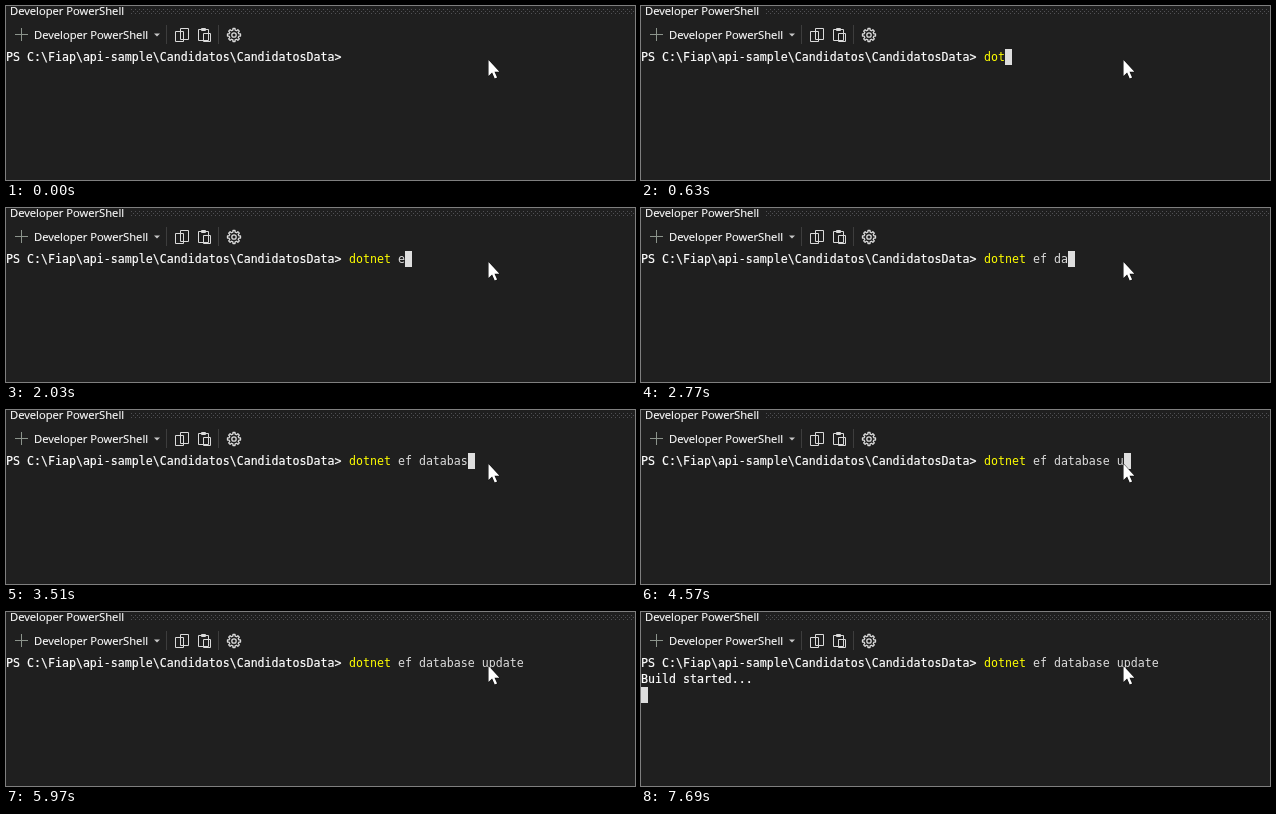
An HTML page that plays this animation: 629 by 174 pixels, repeating every 8000 ms.

```html
<!DOCTYPE html>
<html lang="en">
<head>
<meta charset="utf-8">
<title>Terminal</title>
<style>
  html, body { margin: 0; width: 100%; height: 100%; overflow: hidden; background: #1f1f1f; }
  svg { position: absolute; left: 0; top: 0; display: block; }
  .ui { font: 11.2px "Open Sans", "Noto Sans", sans-serif; fill: #fff; stroke: #fff; stroke-width: .15; }
  .term { font: 11.627px "DejaVu Sans Mono", "Noto Sans Mono", monospace; fill: #dcdcdc; white-space: pre; }
  .strong { fill: #fff; stroke: #fff; stroke-width: .2; }
  .icon { fill: #1f1f1f; stroke: #dadada; }
</style>
</head>
<body>
<svg width="629" height="174" viewBox="0 0 629 174">
  <defs>
    <pattern id="grip" x="125" y="3" width="4" height="4" patternUnits="userSpaceOnUse">
      <path d="M0 0h1v1h-1zM2 2h1v1h-1z" fill="#505054"/>
    </pattern>
  </defs>
  <rect width="629" height="174" fill="#1f1f1f"/>
  <rect x="125" y="3" width="504" height="5" fill="url(#grip)"/>
  <text class="ui" x="4" y="9">Developer PowerShell</text>
  <text class="ui" x="28" y="33">Developer PowerShell</text>

  <path d="M9 28.5H22M15.5 22V35" stroke="#8c948c"/>
  <path d="M148 27.500h6l-3 3z" fill="#c8c8c8"/>
  <path d="M160.500 19V38M212.500 19V38" stroke="#3d3d3d"/>
  <g class="icon">
    <path d="M169.500 25.500h8v10h-8zM174.500 22.500h8v11h-8z"/>
    <path d="M192.500 23.500h10v11h-10zM195.500 22.500h4v2h-4zM197.500 27.500h7v8h-7z"/>
    <path id="gear" stroke-linejoin="round" stroke-width="1.300"/>
    <circle cx="228" cy="29" r="2.200" stroke-width="1.300"/>
  </g>

  <text class="term strong" x="0" y="55">PS C:\Fiap\api-sample\Candidatos\CandidatosData<tspan id="mark">&gt;</tspan></text>
  <text class="term" x="343" y="55"><tspan id="verb"></tspan><tspan id="args"></tspan></text>
  <text class="term strong" id="reply" x="0" y="71">Build started...</text>
  <rect id="caret" width="7" height="16" fill="#dedede"/>
  <path d="M482.500 54v16l3.600-3.400 2.600 5.900 2.400-1-2.600-5.800h4.900z" fill="#fff" stroke="#000" paint-order="stroke"/>
</svg>
<script>
const LOOP = 8000, BLINK = 530, ENTER = 5440, REPLY = 7090;
const CELL = 7, LEFT = 343, TOP = 43, ROW = 16;

// bursts of typing at an even pace
const bursts = [
  { text: "do", at: 160, gap: 200 },
  { text: "tnet", at: 630, gap: 133 },
  { text: " ", at: 1760 },
  { text: "ef da", at: 2030, gap: 185 },
  { text: "tabase", at: 2980, gap: 132 },
  { text: " ", at: 4170 },
  { text: "u", at: 4570 },
  { text: "pdate", at: 4840, gap: 115 }
];
const keys = bursts.flatMap(({ text, at, gap = 0 }) =>
  [...text].map((char, i) => ({ char, time: at + i * gap })));

const el = id => document.getElementById(id);
const [mark, verb, args, reply, caret] = ["mark", "verb", "args", "reply", "caret"].map(el);

function gearPath(cx, cy, teeth) {
  const points = [];
  for (let i = 0; i < teeth; i++) {
    for (const [offset, r] of [[-.3, 5], [-.2, 6.6], [.2, 6.6], [.3, 5]]) {
      const a = (i + offset) * 2 * Math.PI / teeth;
      points.push((cx + r * Math.sin(a)).toFixed(2) + " " + (cy - r * Math.cos(a)).toFixed(2));
    }
  }
  return "M" + points.join("L") + "Z";
}
el("gear").setAttribute("d", gearPath(228, 29, 8));

function draw(time) {
  const pressed = keys.filter(key => key.time <= time);
  const typed = pressed.map(key => key.char).join("");
  const keyword = typed === "do"; // an unfinished loop is a syntax error
  verb.textContent = typed.slice(0, 6);
  args.textContent = typed.slice(6);
  verb.style.fill = keyword ? "#0f0" : "#ff0";
  mark.style.fill = mark.style.stroke = keyword ? "#f00" : "#fff";
  reply.style.display = time >= REPLY ? "" : "none";

  // every key press restarts the blink
  const row = (time >= ENTER) + (time >= REPLY);
  const lastKey = row ? ENTER : pressed.at(-1)?.time ?? -BLINK;
  const lit = Math.floor((time - lastKey) / BLINK) % 2 === 0;
  caret.style.display = lit ? "" : "none";
  caret.setAttribute("x", row ? 0 : LEFT + typed.length * CELL);
  caret.setAttribute("y", TOP + row * ROW);
}

const start = performance.now();
function tick() {
  draw((performance.now() - start) % LOOP);
  requestAnimationFrame(tick);
}
tick();
</script>
</body>
</html>
```
